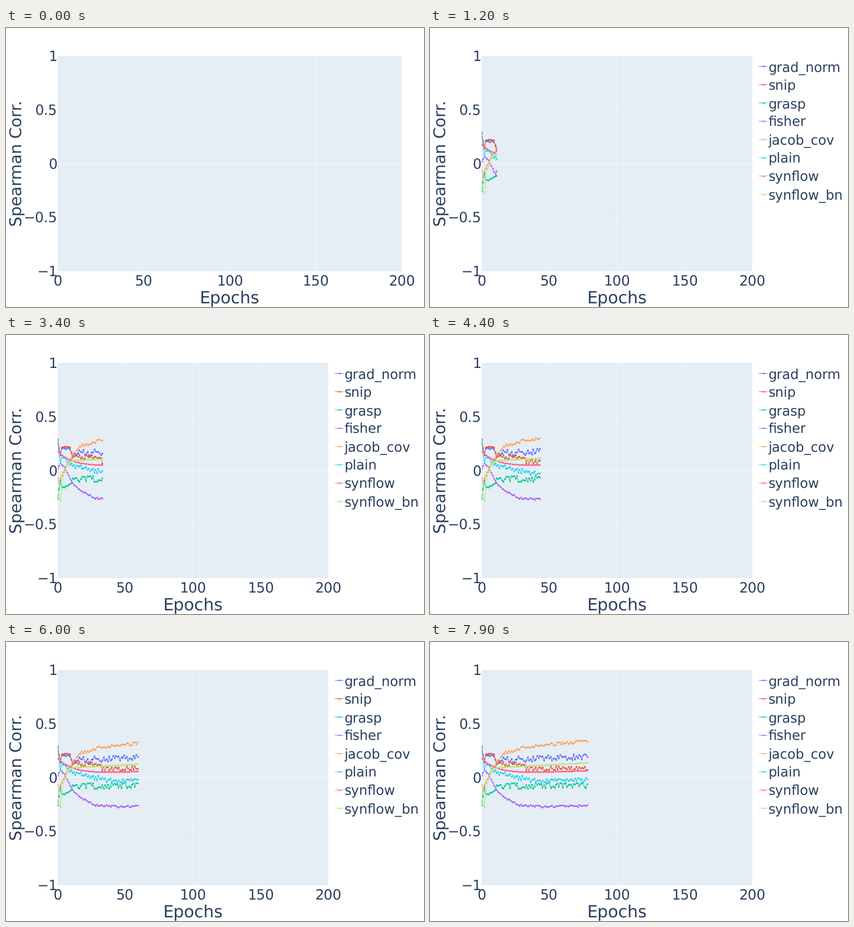
Recreate the animation shown at these times as a matplotlib script. Size 800 by 533 pixels, loop 8000 ms.

```python
import numpy as np
import matplotlib.pyplot as plt
from matplotlib.animation import FuncAnimation
from matplotlib.patches import Rectangle

plt.rcParams.update({
    "font.family": "DejaVu Sans",
    "text.hinting": "none",
    "path.snap": False,
})

W, H, DPI = 800, 533, 100
FRAMES, INTERVAL = 80, 100
PT = 72 / DPI                      # points per pixel

LEFT, TOP, BOTTOM = 98.8, 53.3, 464.4
RIGHT_EMPTY, RIGHT_LEGEND = 757.3, 616.7
X_MAX = 200
INK, PAPER = "#2a3f5f", "#e5edf5"
TICK, X_TITLE, Y_TITLE, ENTRY = 26.67, 32, 31, 25.6
THIN, LINE, DOT = 0.55, 1.07, 3.2

epochs = np.arange(FRAMES - 1)
rng = np.random.default_rng(7)


def y_px(v):
    return TOP + (1 - v) / 2 * (BOTTOM - TOP)


def x_px(e, right):
    return LEFT + e / X_MAX * (right - LEFT)


def wander(points, jitter=0):
    """Trend through a few points (in hundredths) with jitter that sets in."""
    trend = np.interp(epochs, list(points), list(points.values()))
    ramp = np.minimum(1, epochs / 12) ** 2
    return (trend + ramp * rng.uniform(-jitter, jitter, len(epochs))) / 100


# "fi" and "fl" are set as ligatures
series = [
    ("grad_norm", "#636efa", wander(
        {0: 28, 2: 14, 3: 21, 9: 20, 11: 15, 24: 17, 45: 18.5, 78: 19}, 3)),
    ("snip", "#ef553b", wander(
        {0: 29, 2: 14, 3: 22, 9: 22, 11: 14, 30: 12, 33: 8.5, 78: 7.8}, 2.5)),
    ("grasp", "#00cc96", wander(
        {0: -26, 2: -9, 3: -16, 9: -13, 12: -7.5, 78: -7}, 3)),
    ("\ufb01sher", "#ab63fa", wander(
        {0: 2, 2: 6.5, 5: 3.5, 11: -12, 18: -19, 28: -25.5, 46: -27,
         78: -26}, 1)),
    ("jacob_cov", "#ffa15a", wander(
        {0: -7, 1: -12, 2: -7, 7: 6, 13: 17.5, 17: 23, 34: 29, 78: 34}, 1.5)),
    ("plain", "#19d3f3", wander(
        {0: 28, 2: 7, 3: 12, 5: 12, 11: 4, 20: 2, 40: -3, 78: -2}, 2.5)),
    ("syn\ufb02ow", "#ff6692",
     0.03 + 0.00045 * epochs + 0.15 * np.exp(-epochs / 11)),
    ("syn\ufb02ow_bn", "#b6e880", wander(
        {0: -16, 2: -28, 4: -5, 8: 8, 11: 9.3, 78: 13.8})),
]

fig = plt.figure(figsize=(W / DPI, H / DPI), dpi=DPI, facecolor="white")
ax = fig.add_axes([0, 0, 1, 1])
ax.set_xlim(0, W)
ax.set_ylim(H, 0)
ax.axis("off")


def text(x, y, s, size, ha="center", **kw):
    return ax.text(x, y, s, fontsize=size * PT, color=INK, ha=ha,
                   va="baseline", **kw)


def stroke(xs, ys, color, width, **kw):
    return ax.plot(xs, ys, color=color, lw=width * PT, **kw)[0]


def trace(color, xs=(), ys=()):
    return stroke(xs, ys, color, LINE, marker="o", ms=DOT * PT, mew=0,
                  solid_joinstyle="round", zorder=3)


panel = ax.add_patch(Rectangle((LEFT, TOP), RIGHT_EMPTY - LEFT, BOTTOM - TOP,
                               fc=PAPER, lw=0))
v_grid = [stroke([0, 0], [TOP, BOTTOM], "white", THIN) for _ in range(3)]
h_grid = [stroke([LEFT, LEFT], [y_px(v)] * 2, "white", LINE if v == 0 else THIN,
                 solid_capstyle="butt") for v in (-0.5, 0.5, 0)]

for v in (1, 0.5, 0, -0.5, -1):
    label = f"{v:g}".replace("-", "\u2212")
    text(98, y_px(v) + 0.35 * TICK, label, TICK, ha="right")

x_ticks = [text(0, 491.4, str(e), TICK) for e in range(0, X_MAX + 1, 50)]
x_title = text(0, 525.3, "Epochs", X_TITLE)
text(29.6, (TOP + BOTTOM) / 2, "Spearman Corr.", Y_TITLE, rotation=90,
     rotation_mode="anchor")

curves = []
legend = []
for i, (name, color, _) in enumerate(series):
    curve = trace(color)
    curve.set_clip_path(panel)
    curves.append(curve)
    y = 73.4 + 34.88 * i
    legend += [
        stroke([629.6, 645.6], [y, y], color, LINE, solid_capstyle="butt"),
        trace(color, [637.6], [y]),
        text(647.9, y + 10, name, ENTRY, ha="left"),
    ]


def layout(right):
    panel.set_width(right - LEFT)
    for k, line in enumerate(v_grid, 1):
        line.set_xdata([x_px(50 * k, right)] * 2)
    for line in h_grid:
        line.set_xdata([LEFT, right])
    for k, label in enumerate(x_ticks):
        label.set_x(x_px(50 * k, right))
    x_title.set_x((LEFT + right) / 2)


def update(n):
    right = RIGHT_LEGEND if n else RIGHT_EMPTY
    layout(right)
    for item in legend:
        item.set_visible(n > 0)
    for curve, (_, _, values) in zip(curves, series):
        curve.set_data(x_px(epochs[:n], right), y_px(values[:n]))
    return curves


anim = FuncAnimation(fig, update, frames=FRAMES, interval=INTERVAL,
                     repeat=True, repeat_delay=0, blit=False)
plt.show()
```
